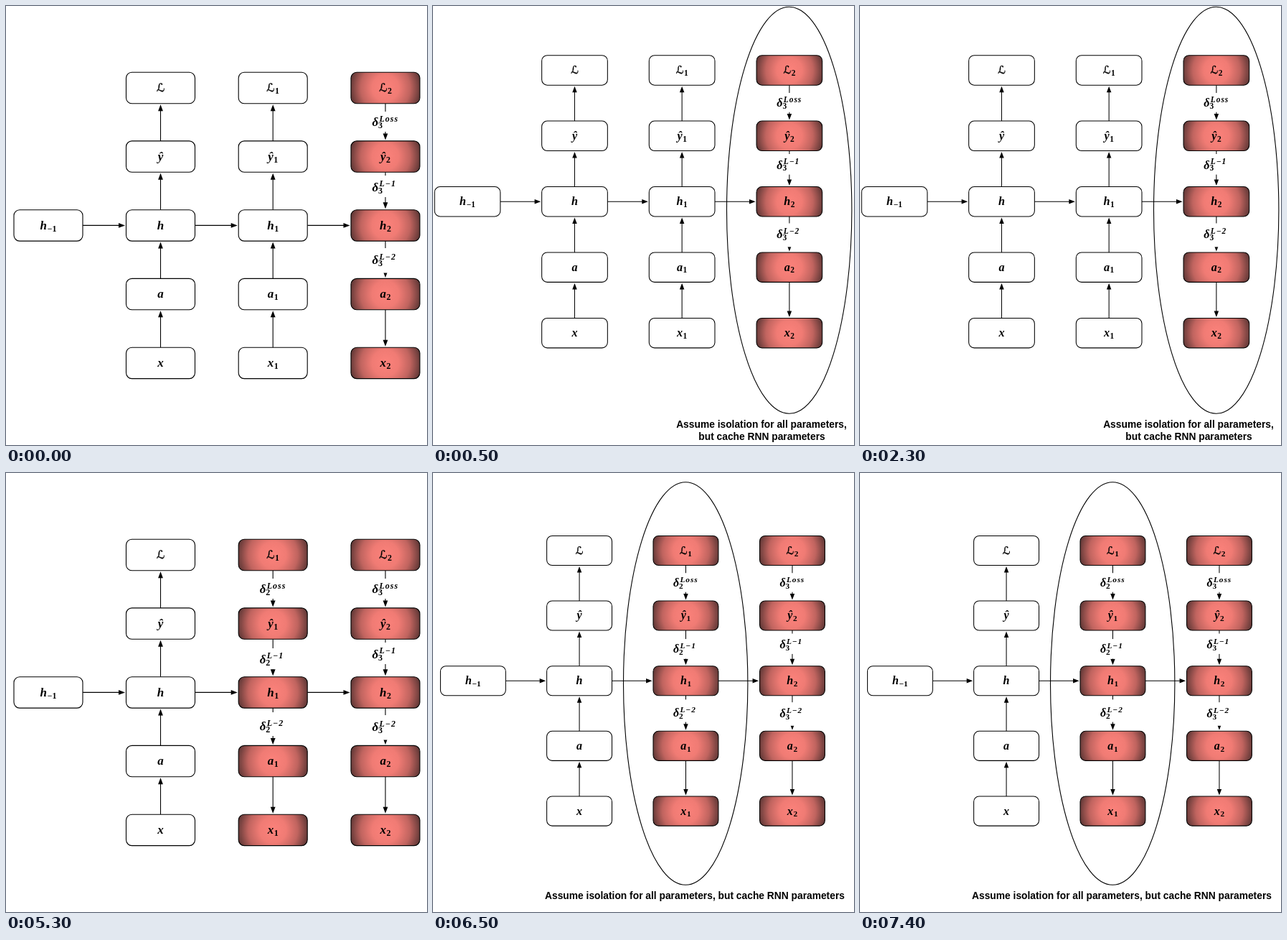
Recreate the animation shown at these times as an HTML page. Size 587x611 px, loop 8 s.

```html
<!DOCTYPE html>
<html lang="en">
<head>
<meta charset="utf-8">
<title>Backpropagation through time</title>
<style>
  html, body { margin: 0; width: 100%; height: 100%; overflow: hidden; background: #fff; }
  svg { display: block; width: 587px; height: 611px; }
  .math { font: italic bold 17px "Liberation Serif", serif; }
  .cal { font: 15.5px "DejaVu Sans", sans-serif; stroke: #000; stroke-width: .4px; }
  .sub { font: bold 12px "Liberation Serif", serif; stroke: none; }
  .sup { font: italic bold 12px "Liberation Serif", serif; letter-spacing: 1px; }
  .note { font: bold 13.8px "Liberation Sans", Arial, sans-serif; text-anchor: middle; }
  .line { fill: none; stroke: #000; stroke-width: 1.1; }
</style>
</head>
<body>
<svg id="stage" viewBox="0 0 587 611">
  <defs>
    <radialGradient id="glow" gradientUnits="userSpaceOnUse" cx="0" cy="0" r="53">
      <stop offset="0" stop-color="#fc827b"/>
      <stop offset=".35" stop-color="#f07b74"/>
      <stop offset=".65" stop-color="#c0645f"/>
      <stop offset="1" stop-color="#4c2e2d"/>
    </radialGradient>
  </defs>
</svg>
<script>
const stage = document.getElementById('stage');
const COLS = [215.5, 372.2, 529];
const ROWS = [114, 209.6, 305.4, 401.1, 496.9];
const NAMES = ['ℒ', 'ŷ', 'h', 'a', 'x'];
const W = 96, H = 43.4;

// Labels on the backward arrows: gap top, gap bottom, baseline of the delta.
const GAPS = {
  1: [[147, 175, 167], [244, 273, 264.5], [333, 366, 358]],
  2: [[147, 175, 167], [236, 266, 257.5], [337, 371.5, 359]]
};
const POWERS = ['Loss', 'L−1', 'L−2'];

// lit: first column in backward pass; view: scale, x, y; ring: cx, cy, rx, ry.
const SCENES = [
  { from: 0, lit: 2, view: [1, 0, 0] },
  { from: 500, lit: 2, view: [.955, -8.3, -19.4], ring: [496.7, 284.3, 87.2, 283],
    note: [['Assume isolation for all parameters,', 458, 587], ['but cache RNN parameters', 458.5, 604]] },
  { from: 3500, lit: 1, view: [1, 0, 0] },
  { from: 6500, lit: 1, view: [.947, 0, 0], ring: [352.2, 293, 86.7, 280.3],
    note: [['Assume isolation for all parameters, but cache RNN parameters', 365, 592.5]] }
];
const LOOP = 8000;

function add(parent, tag, attrs, text) {
  const el = document.createElementNS('http://www.w3.org/2000/svg', tag);
  for (const key in attrs) el.setAttribute(key, attrs[key]);
  if (text) el.textContent = text;
  parent.appendChild(el);
  return el;
}

function node(g, x, y, name, index, lit) {
  const box = add(g, 'g', { transform: `translate(${x} ${y})` });
  add(box, 'rect', { x: -W / 2, y: -H / 2, width: W, height: H, rx: 8,
    class: 'line', style: `fill:${lit ? 'url(#glow)' : '#fff'}` });
  const label = add(box, 'text', { y: 5.2, 'text-anchor': 'middle', class: name === 'ℒ' ? 'cal' : 'math' }, name);
  add(label, 'tspan', { dx: .6, dy: 3, class: 'sub' }, index);
}

// Straight arrow; the tip stops just short of the end point.
function arrow(g, x1, y1, x2, y2) {
  const angle = Math.atan2(y2 - y1, x2 - x1) * 180 / Math.PI;
  const tip = Math.hypot(x2 - x1, y2 - y1) - 1.5;
  const a = add(g, 'g', { transform: `translate(${x1} ${y1}) rotate(${angle})` });
  add(a, 'path', { d: `M0 0H${tip - 5}`, class: 'line' });
  add(a, 'path', { d: `M${tip} 0l-9 -3.4v6.8z` });
}

function delta(g, x, [top, bottom, base], power, index) {
  add(g, 'rect', { x: x - 20, y: top, width: 40, height: bottom - top, fill: '#fff' });
  const left = x - 18.5;
  add(g, 'text', { x: left, y: base, class: 'math' }, 'δ');
  add(g, 'text', { x: left + 8.6, y: base + 3, class: 'sub' }, index);
  add(g, 'text', { x: left + 10, y: base - 6.5, class: 'sup' }, power);
}

function build({ lit, view: [scale, dx, dy], ring, note = [] }) {
  const scene = add(stage, 'g', { visibility: 'hidden' });
  const g = add(scene, 'g', { transform: `translate(${dx} ${dy}) scale(${scale})` });
  const xs = [59, ...COLS];
  COLS.forEach((x, i) => arrow(g, xs[i] + W / 2, ROWS[2], x - W / 2, ROWS[2]));
  COLS.forEach((x, c) => {
    for (let r = 0; r < 4; r++) {
      const low = ROWS[r] + H / 2, high = ROWS[r + 1] - H / 2;
      if (c < lit) arrow(g, x, high, x, low);
      else {
        arrow(g, x, low, x, high);
        if (r < 3) delta(g, x, GAPS[c][r], POWERS[r], c + 1);
      }
    }
    NAMES.forEach((name, r) => node(g, x, ROWS[r], name, c, c >= lit));
  });
  node(g, xs[0], ROWS[2], 'h', '−1', false);
  if (ring) {
    const [cx, cy, rx, ry] = ring;
    add(scene, 'ellipse', { cx, cy, rx, ry, class: 'line' });
  }
  for (const [text, x, y] of note) add(scene, 'text', { x, y, class: 'note' }, text);
  return scene;
}

const scenes = SCENES.map(build);
let shown = -1;

function draw() {
  const t = performance.now() % LOOP;
  const now = SCENES.filter(s => s.from <= t).length - 1;
  if (now !== shown) {
    scenes.forEach((s, i) => s.setAttribute('visibility', i === now ? 'visible' : 'hidden'));
    shown = now;
  }
  requestAnimationFrame(draw);
}
draw();
</script>
</body>
</html>
```
